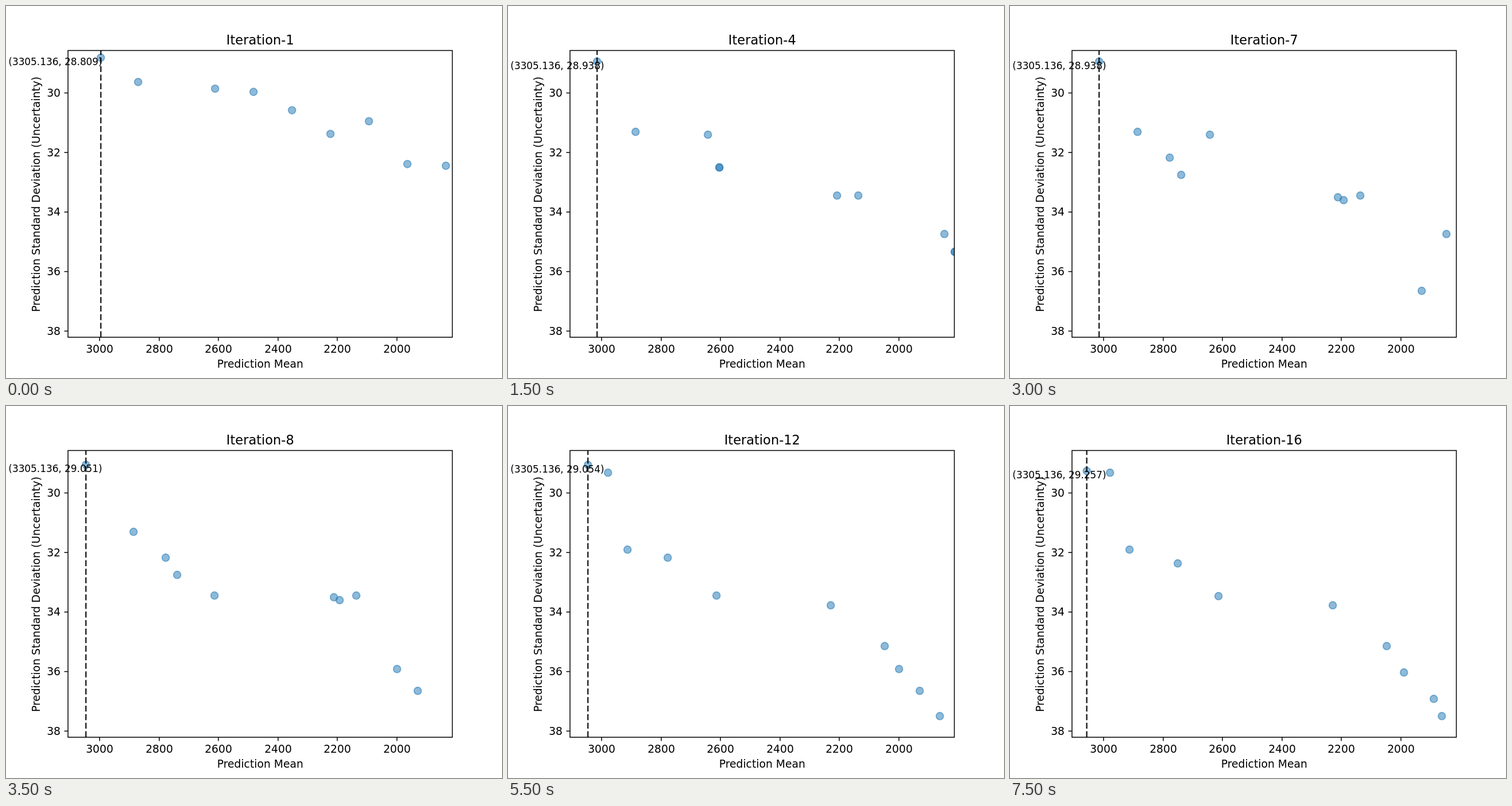
Write an HTML page that moves like this. It is 864 px wide and 648 px high and loops after 8 s.

```html
<!DOCTYPE html>
<html lang="en">
<head>
<meta charset="utf-8">
<title>Prediction mean and uncertainty</title>
<style>
  html, body { margin: 0; width: 100%; height: 100%; overflow: hidden; background: #fff; }
  svg { display: block; width: 864px; height: 648px; font: 18.75px "DejaVu Sans", sans-serif; }
  text { text-anchor: middle; }
  #title { font-size: 22.5px; }
  #label { font-size: 16.875px; }
  #yTicks text { text-anchor: end; }
  #axes path, #axes rect { fill: none; stroke: #000; stroke-width: 1.5; }
  #dots circle { fill: #1f77b4; stroke: #1f77b4; stroke-width: 1.875; fill-opacity: .5; stroke-opacity: .5; }
  #best { stroke: #000; stroke-opacity: .85; stroke-width: 2.5; stroke-dasharray: 10.4 4.5; }
</style>
</head>
<body>
<svg viewBox="0 0 864 648">
  <clipPath id="plot"><rect x="108" y="77.5" width="669.5" height="499.5"/></clipPath>
  <g clip-path="url(#plot)">
    <g id="dots"></g>
    <line id="best" y1="577" y2="77.5"/>
  </g>
  <g id="axes">
    <rect x="108" y="77.5" width="669.5" height="499.5"/>
    <g id="xTicks"></g>
    <g id="yTicks"></g>
  </g>
  <text x="442.8" y="630">Prediction Mean</text>
  <text transform="translate(58.8 328) rotate(-90)">Prediction Standard Deviation (Uncertainty)</text>
  <text id="title" x="442.8" y="66.5"></text>
  <text id="label" x="86"></text>
</svg>
<script>
const STEP = 500, STEPS = 16;
const $ = id => document.getElementById(id);
const yOf = std => 151.5 + (std - 30) * 51.85;
const random = n => Math.abs(Math.sin(n * 12.9898) * 43758.5453) % 1;

// Each new best candidate: [iteration, x, standard deviation]
const records = [
  [1, 165, 28.809], [3, 159, 28.9], [4, 155, 28.938], [8, 139, 29.051],
  [9, 139, 29.054], [13, 133.5, 29.256], [15, 133.5, 29.257]
];

// The other candidates start scattered, then reach these spots by each milestone.
const milestones = [1, 3, 8, 16];
const paths = [
  [[736, 380], [610, 330], [656, 418]],
  [[287, 166], [222, 219], [208, 250]],
  [[573, 330], [571, 333], [562, 347]],
  [[368, 281], [581, 338], [752, 540]],
  [[778, 428], [298, 294], [174, 116]],
  [[368, 281], [278, 264], [292, 274]],
  [[778, 428], [717, 496], [738, 510]],
  [[760, 397], [681, 458], [686, 464]],
  [[348, 224], [363, 330], [363, 331]]
].map((path, i) => [scatter(i), ...path]);

function scatter(i) {
  return [230 + 67 * i, 90 + 24 * i + 100 * (random(i + 1) - .5)];
}

// Candidates jump one after another, evenly spread between two milestones.
function place(path, i, iter) {
  const leg = Math.max(0, milestones.findIndex(m => iter <= m) - 1);
  const progress = (iter - milestones[leg]) / (milestones[leg + 1] - milestones[leg]);
  return path[progress >= (i + .5) / paths.length ? leg + 1 : leg];
}

const dot = ([x, y]) => `<circle cx="${x + .2}" cy="${y + .2}" r="6.4"/>`;

function drawTicks() {
  let xs = "", ys = "";
  for (let mean = 3000; mean >= 2000; mean -= 200) {
    const x = Math.round(163 + (3000 - mean) * .5175);
    xs += `<path d="M${x} 577v6.5"/><text x="${x}" y="604">${mean}</text>`;
  }
  for (let std = 30; std <= 38; std += 2) {
    const y = yOf(std);
    ys += `<path d="M108 ${y}h-6.5"/><text x="95" y="${y + 6.5}">${std}</text>`;
  }
  $("xTicks").innerHTML = xs;
  $("yTicks").innerHTML = ys;
}

function draw(iter) {
  const [, x, std] = records.filter(([since]) => since <= iter).pop();
  const y = yOf(std);
  const others = paths.map((path, i) => place(path, i, iter));
  $("dots").innerHTML = [[x, y], ...others].map(dot).join("");
  $("best").setAttribute("x1", x + .2);
  $("best").setAttribute("x2", x + .2);
  $("title").textContent = `Iteration-${iter}`;
  $("label").textContent = `(3305.136, ${std.toFixed(3)})`;
  $("label").setAttribute("y", Math.round(y + 13.1));
}

let shown = 0;
const start = performance.now();
function tick() {
  const iter = Math.floor((performance.now() - start) / STEP) % STEPS + 1;
  if (iter !== shown) draw(shown = iter);
  requestAnimationFrame(tick);
}
drawTicks();
tick();
</script>
</body>
</html>
```
